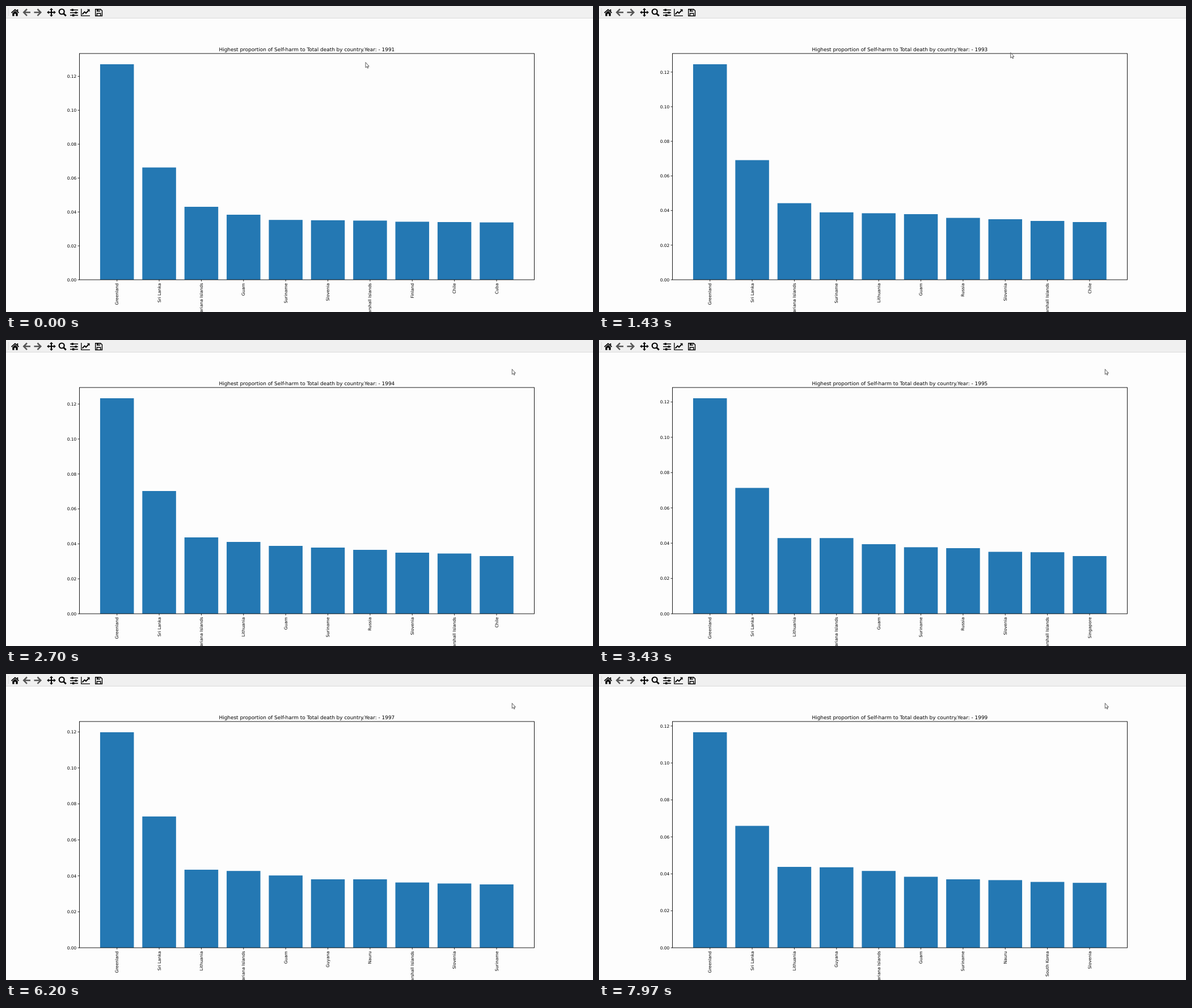
An HTML page for the animation above (8000 ms loop, 1035 by 541 pixels).

```html
<!DOCTYPE html>
<html lang="en">
<head>
<meta charset="utf-8">
<title>Bar chart by year</title>
<style>
html, body { margin: 0; width: 100%; height: 100%; overflow: hidden; background: #fdfdfd; }
svg { display: block; width: 1035px; height: 541px; }
text { font: 7.43px "DejaVu Sans", sans-serif; text-rendering: geometricPrecision; text-anchor: end; }
#title { font-size: 8.92px; text-anchor: middle; }
.line { fill: none; stroke: #000; }
</style>
</head>
<body>
<svg viewBox="0 0 1035 541">
  <rect width="1035" height="541" fill="#fdfdfd"/>
  <rect width="1035" height="21" fill="#f0f0f0"/>
  <path d="M0 21.5H1035" stroke="#d9d9d9"/>
  <path d="M4.5 4V18" stroke="#c4c4c4" stroke-dasharray="1 1"/>

  <!-- home, back, forward -->
  <path class="line" d="M9.5 12.2 16 6.3 22.5 12.2" stroke-width="1.7"/>
  <path d="M19.3 6h2v4l-2-2zM11.3 12.7 16 8.6 20.7 12.7V17.8H17.4V13.8H14.6V17.8H11.3Z"/>
  <g class="line" style="stroke:#555" stroke-width="2.5">
    <path d="M43 11.3H31.5M37 5.5 31.2 11.3 37 17.1"/>
    <path d="M49.5 11.3H61M55.5 5.5 61.3 11.3 55.5 17.1"/>
  </g>
  <!-- pan, zoom, sliders -->
  <path class="line" d="M74 11.3H86M80 5.3V17.3" stroke-width="2"/>
  <path d="M80 3.5l3 3.4h-6zM80 19.1l3-3.4h-6zM72.2 11.3l3.4-3v6zM87.8 11.3l-3.4-3v6z"/>
  <circle class="line" cx="98.2" cy="10" r="4.5" stroke-width="2.2"/>
  <path class="line" d="M101.6 13.4 105.8 17.6" stroke-width="2.8"/>
  <path class="line" d="M113 7H127M113 11.7H127M113 16.4H127" stroke-width="1.5"/>
  <path d="M115.5 5.2h3.4v3.6h-3.4zM121.5 9.9h3.4v3.6h-3.4zM117 14.6h3.4v3.6H117z"/>
  <!-- plot, save -->
  <path class="line" d="M132.8 5V17.3H148" stroke-width="1.3"/>
  <path class="line" d="M134.6 14.6 138.6 10.4 141 12.7 146 7.5" stroke-width="2"/>
  <path d="M142.8 5.8H147.5V10.5Z"/>
  <path class="line" d="M157.7 5.7H166.8L169.5 8.4V17.5H157.7ZM160.4 17.5V13H166.8V17.5" stroke-width="1.4"/>
  <path d="M160 5.5h6v4.4h-6z"/>
  <path d="M163.4 6.3h1.5v2.6h-1.5z" fill="#f0f0f0"/>

  <text id="title" x="530.4" y="79.6"></text>
  <g id="chart"></g>
  <rect class="line" x="129.5" y="84" width="802" height="400" stroke-width=".9"/>
  <path id="cursor" d="M0 0V9.3L2.1 7.4 3.5 10.4 4.9 9.8 3.6 6.9H6.1Z" fill="#fff" stroke="#333" stroke-width=".8"/>
</svg>
<script>
const LOOP = 8000, FIRST = 80, STEP = 1067;
const BASE = 484, TOP = 103, GAP = 74.37;

const names = {
  G: "Greenland", L: "Sri Lanka", N: "Northern Mariana Islands", U: "Guam", S: "Suriname",
  V: "Slovenia", M: "Marshall Islands", F: "Finland", C: "Chile", B: "Cuba", T: "Lithuania",
  P: "Singapore", R: "Russia", Y: "Guyana", A: "Nauru", K: "South Korea"
};

// per year: bar order, pixels per 0.02, tops of the bars after the first
const years = [
  ["GLNUSVMFCB", 59.93, [285.5, 355, 369, 378.2, 378.8, 379.4, 381.4, 382, 382.6]],
  ["GLNUSTVMPC", 60.2, [282.6, 354.6, 372, 372, 378.3, 379, 380, 382, 383.2]],
  ["GLNSTURVMC", 61.2, [272.5, 348.6, 364.8, 366.4, 368, 374.6, 377, 380, 382]],
  ["GLNTUSRVMC", 61.8, [267, 349, 357, 364, 367, 371, 376, 377.5, 382]],
  ["GLTNUSRVMP", 62.4, [261.5, 350.2, 350.2, 361, 366.4, 368, 374.5, 375.2, 382]],
  ["GLTNURYVSM", 63.4, [253, 346, 353, 354, 369.2, 370.8, 371.4, 372, 375.2]],
  ["GLTNUYAMVS", 63.6, [251.9, 346, 348.2, 356.2, 363, 363, 368.6, 370.4, 372]],
  ["GLTNYUASVK", 64.4, [260, 343.5, 347, 351, 359, 363, 366.5, 369, 370.5]],
  ["GLTYNUSAKV", 65.35, [268.5, 341, 341.7, 348.2, 358.5, 363, 364.4, 367.6, 369.2]]
];

const $ = id => document.getElementById(id);
const tick = d => `<path class="line" d="${d}" stroke-width=".8"/>`;

function drawYear(n) {
  const [order, unit, tops] = years[n];
  let out = "";
  [TOP, ...tops].forEach((y, i) => {
    const x = 195.7 + GAP * i;
    out += `<rect x="${x - 29.75}" y="${y}" width="59.5" height="${BASE - y}" fill="#2478b3"/>`
      + tick(`M${x} ${BASE}v3`)
      + `<text transform="translate(${x + 2.5} 490) rotate(-90)">${names[order[i]]}</text>`;
  });
  for (let k = 0; k <= 6; k++) {
    const y = BASE - k * unit;
    out += tick(`M129.5 ${y}h-3`) + `<text x="124.3" y="${y + 2.7}">${(k * 0.02).toFixed(2)}</text>`;
  }
  $("chart").innerHTML = out;
  $("title").textContent = `Highest proportion of Self-harm to Total death by country.Year: - ${1991 + n}`;
}

let shown = -1;
function frame(now) {
  const t = now % LOOP;
  const n = Math.max(0, Math.floor((t - FIRST) / STEP) + 1);
  if (n !== shown) drawYear(shown = n);
  const p = Math.min(1, Math.max(0, (t - 1250) / 450));
  const e = p * p * (3 - 2 * p);
  $("cursor").setAttribute("transform", `translate(${634 + 258.3 * e} ${99.6 - 48 * e})`);
  requestAnimationFrame(frame);
}
const start = performance.now();
const loop = () => frame(Math.max(0, performance.now() - start));
frame = (draw => () => draw(Math.max(0, performance.now() - start)))(frame);
loop();
</script>
</body>
</html>
```
